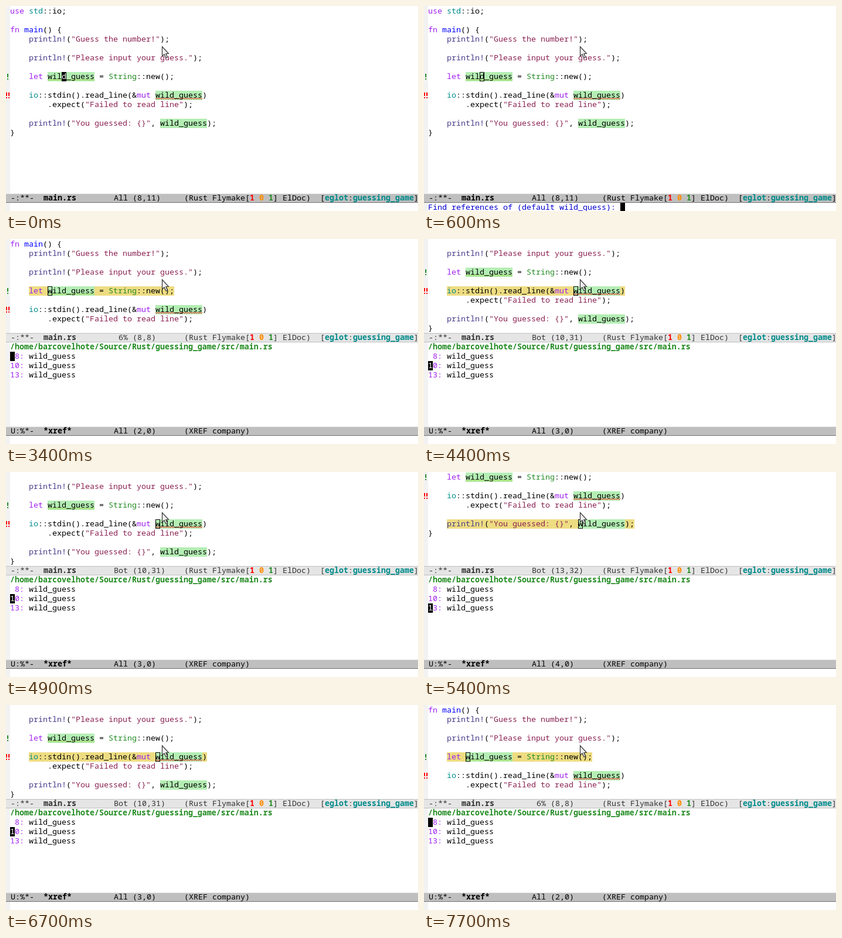
These frames come from a looping animation (703 px wide and 351 px high, 8 s). An HTML page with a canvas:

```html
<!DOCTYPE html>
<html lang="en">
<head>
<meta charset="utf-8">
<title>Finding references in an editor</title>
<style>
  html, body { margin: 0; width: 100%; height: 100%; overflow: hidden; background: #fff; }
  canvas { display: block; }
</style>
</head>
<body>
<canvas id="stage" width="703" height="351"></canvas>
<script>
const ctx = document.getElementById('stage').getContext('2d');
const WIDTH = 703, HEIGHT = 351, LOOP = 8000, PULSE = 500;
const CELL = 8, ROW = 16, LEFT = 7, TOP = 1;
const FONT = '13.333px "Noto Sans Mono", monospace';
const MODE_ROW = 20, SPLIT_ROW = 10;

const color = {
  text: '#000', keyword: '#a020f0', constant: '#008b8b', macro: '#483d8b',
  string: '#8b2252', type: '#228b22', func: '#0000ff', prompt: '#0000cd',
  error: '#ff0000', warning: '#ff8c00', note: '#9acd32', fringe: '#f2f2f2',
  symbol: '#b4eeb4', pulse: '#eedc82',
};

const code = `use std::io;

fn main() {
    println!("Guess the number!");

    println!("Please input your guess.");

    let wild_guess = String::new();

    io::stdin().read_line(&mut wild_guess)
        .expect("Failed to read line");

    println!("You guessed: {}", wild_guess);
}`.split('\n');

const syntax = [
  [/^"/, color.string],
  [/^(use|fn|let|mut)$/, color.keyword],
  [/^println!$/, color.macro],
  [/^String$/, color.type],
  [/^(std|io)$/, color.constant],
  [/^main$/, color.func],
];
const tokens = /("[^"]*"|\b(?:use|fn|let|mut|main|String)\b|println!|\b(?:std|io)(?=::))/;

// Diagnostics by line number: underline colour, fringe colour, fringe mark positions.
const diagnostics = {
  8: { wave: color.note, mark: color.type, at: [2] },
  10: { wave: color.error, mark: color.error, at: [0, 4] },
};

const symbol = 'wild_guess';
const path = '/home/barcovelhote/Source/Rust/guessing_game/src/main.rs';
const hits = [' 8:', '10:', '13:'];

// `xref` is the current line of the results window, when it is open.
const first = { top: 1, line: 8, col: 11 };
const hit8 = { top: 3, line: 8, col: 8, where: ' 6%', xref: 2 };
const hit10 = { top: 5, line: 10, col: 31, where: 'Bot', xref: 3 };
const hit13 = { top: 8, line: 13, col: 32, where: 'Bot', xref: 4 };
const scenes = [
  { at: 0, ...first, where: 'All' },
  { at: 600, ...first, where: 'All', prompt: true },
  { at: 1900, ...first, where: 'Top', xref: 1 },
  { at: 3400, ...hit8 },
  { at: 4400, ...hit10 },
  { at: 5400, ...hit13 },
  { at: 6700, ...hit10 },
  { at: 7700, ...hit8 },
];

const colX = col => LEFT + col * CELL;
const rowY = row => TOP + row * ROW;

function rect(x, y, w, h, fill) {
  ctx.fillStyle = fill;
  ctx.fillRect(x, y, w, h);
}

function shade(col, row, length, fill) {
  rect(colX(col), rowY(row), length * CELL, ROW, fill);
}

function write(col, row, text, fill = color.text, bold = false, indent = 0) {
  ctx.font = (bold ? 'bold ' : '') + FONT;
  ctx.fillStyle = fill;
  ctx.fillText(text, colX(col) + indent, rowY(row) + 12);
}

// Mode line text is pushed right by the one-pixel box around it.
const writeMode = (col, row, text, fill, bold) => write(col, row, text, fill, bold, 1);

function blockCursor(col, row, char = '', bold = false) {
  shade(col, row, 1, '#000');
  write(col, row, char, '#fff', bold);
}

function hollowCursor(col, row) {
  ctx.strokeStyle = '#000';
  ctx.lineWidth = 1;
  ctx.strokeRect(colX(col) + .5, rowY(row) + .5, CELL - 1, ROW - 1);
}

function wave(col, row, length, stroke) {
  const x = colX(col), y = rowY(row) + 12.5;
  ctx.beginPath();
  for (let i = 0; i <= length * CELL; i += 2) ctx.lineTo(x + i, y + (i % 4));
  ctx.strokeStyle = stroke;
  ctx.lineWidth = 1;
  ctx.stroke();
}

function exclamation(x, row, fill) {
  const y = rowY(row) + 3;
  rect(x, y, 2, 6, fill);
  rect(x, y + 8, 2, 2, fill);
}

function codeLine(number, row, pulsing) {
  const text = code[number - 1];
  const symbolCol = text.indexOf(symbol);
  const issue = diagnostics[number];
  if (pulsing) shade(4, row, text.length - 4, color.pulse);
  if (symbolCol >= 0) shade(symbolCol, row, symbol.length, color.symbol);
  if (issue) {
    wave(symbolCol, row, symbol.length, issue.wave);
    issue.at.forEach(x => exclamation(x, row, issue.mark));
  }
  let col = 0;
  for (const part of text.split(tokens)) {
    const style = syntax.find(([pattern]) => pattern.test(part));
    write(col, row, part, style ? style[1] : color.text);
    col += part.length;
  }
}

function modeBar(row, active, status, name, position, modes) {
  const y = rowY(row), ink = active ? '#000' : '#333';
  rect(0, y, WIDTH, ROW, active ? '#bfbfbf' : '#e5e5e5');
  rect(0, y, WIDTH, 1, active ? '#e5e5e5' : '#bfbfbf');
  rect(0, y + ROW - 1, WIDTH, 1, active ? '#737373' : '#bfbfbf');
  writeMode(0, row, status, ink);
  writeMode(7, row, name, ink, true);
  writeMode(22, row, position, ink);
  writeMode(37, row, modes, ink);
  return ink;
}

function codeModeBar(row, scene) {
  const ink = modeBar(row, !scene.xref, '-:**-', 'main.rs',
    `${scene.where} (${scene.line},${scene.col})`, '(Rust Flymake[');
  writeMode(51, row, '1', color.error, true);
  writeMode(53, row, '0', color.warning, true);
  writeMode(55, row, '1', color.type, true);
  writeMode(56, row, '] ElDoc)  [', ink);
  writeMode(67, row, 'eglot', color.constant, true);
  writeMode(72, row, ':', ink);
  writeMode(73, row, 'guessing_game', color.constant, true);
  writeMode(86, row, ']', ink);
}

function results(current) {
  const top = SPLIT_ROW + 1;
  write(0, top, path, color.type, true);
  hits.forEach((label, i) => {
    write(0, top + 1 + i, label, color.keyword);
    write(4, top + 1 + i, symbol);
  });
  const line = [path, ...hits][current - 1];
  blockCursor(0, top + current - 1, line[0], current === 1);
  modeBar(MODE_ROW, true, 'U:%*-', '*xref*', `All (${current},0)`, '(XREF company)');
}

function pointer() {
  ctx.beginPath();
  [[266.5, 69.5], [266.5, 86], [270, 82.8], [273, 89], [275.6, 87.8],
   [272.8, 81.8], [277.3, 81.3]].forEach(([x, y]) => ctx.lineTo(x, y));
  ctx.closePath();
  ctx.fillStyle = '#eee';
  ctx.fill();
  ctx.strokeStyle = '#333';
  ctx.lineWidth = 1.2;
  ctx.stroke();
}

function draw(time) {
  const scene = scenes.findLast(s => s.at <= time);
  const pulsing = scene.xref > 1 && time - scene.at < PULSE;
  const rows = scene.xref ? SPLIT_ROW : MODE_ROW;

  rect(0, 0, WIDTH, HEIGHT, '#fff');
  rect(0, 0, LEFT, HEIGHT, color.fringe);
  for (let row = 0; row < rows && scene.top + row <= code.length; row++) {
    const number = scene.top + row;
    codeLine(number, row, pulsing && number === scene.line);
  }

  const cursorRow = scene.line - scene.top;
  if (scene.xref || scene.prompt) hollowCursor(scene.col, cursorRow);
  else blockCursor(scene.col, cursorRow, code[scene.line - 1][scene.col]);

  codeModeBar(rows, scene);
  if (scene.xref) results(scene.xref);
  if (scene.prompt) {
    const question = `Find references of (default ${symbol}): `;
    write(0, MODE_ROW + 1, question, color.prompt);
    blockCursor(question.length, MODE_ROW + 1);
  }
  pointer();
}

const start = performance.now();
function tick() {
  draw((performance.now() - start) % LOOP);
  requestAnimationFrame(tick);
}
tick();
</script>
</body>
</html>
```
